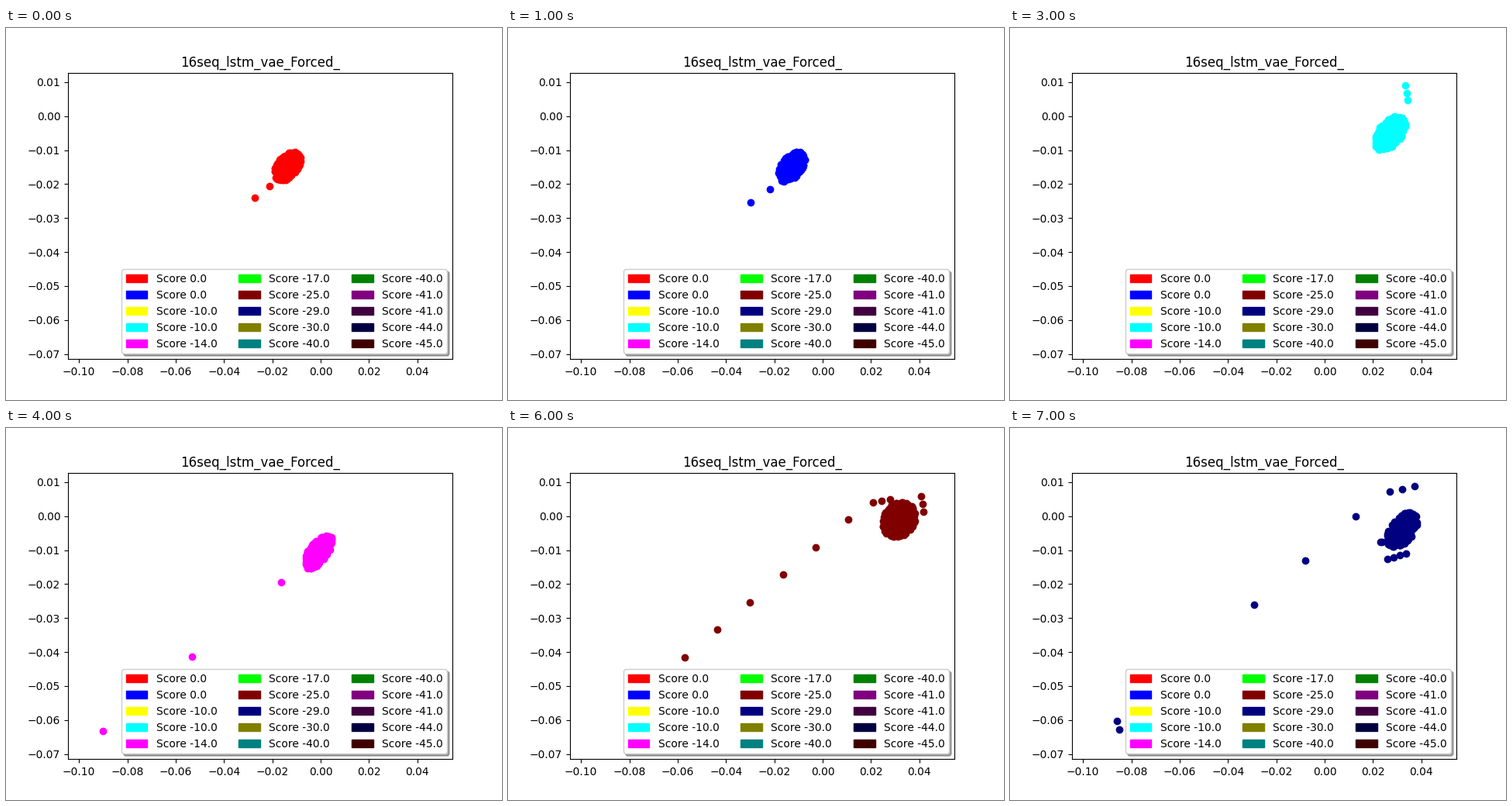
Write a matplotlib script that moves like this. It is 640 by 480 pixels and loops after 8 s.

```python
import numpy as np
import matplotlib.pyplot as plt
from matplotlib.animation import FuncAnimation
from matplotlib.patches import Patch

W, H, DPI = 640, 480, 100
XLIM = (-0.10453, 0.05447)
YLIM = (-0.0715, 0.0128)
TILT = np.radians(52)
COLORS = ["red", "blue", "yellow", "cyan", "magenta",
          "lime", "maroon", "navy", "olive", "teal",
          "green", "purple", "#400040", "#000040", "#400000"]
SCORES = [0, 0, -10, -10, -14, -17, -25, -29, -30, -40, -40, -41, -41, -44, -45]

rng = np.random.default_rng(4)
clouds = []


def to_data(points):
    """Convert stage pixels (y down) to axes data."""
    u = (points[:, 0] - 0.125 * W) / (0.775 * W)
    v = (0.89 * H - points[:, 1]) / (0.77 * H)
    return np.column_stack([XLIM[0] + u * (XLIM[1] - XLIM[0]),
                            YLIM[0] + v * (YLIM[1] - YLIM[0])])


def blob(center, long, short, count=240):
    """Random points filling an ellipse that leans up to the right."""
    angle = rng.uniform(0, 2 * np.pi, count)
    radius = np.sqrt(rng.random(count))
    a = long * radius * np.cos(angle)
    b = short * radius * np.sin(angle)
    x = a * np.cos(TILT) - b * np.sin(TILT)
    y = a * np.sin(TILT) + b * np.cos(TILT)
    return np.column_stack([center[0] + x, center[1] - y])


def add_cloud(center, long, short, *trails):
    """Each trail is a start, an end and a number of evenly spaced strays."""
    parts = [blob(center, long, short)]
    parts += [np.linspace(start, end, n) for start, end, n in trails]
    clouds.append(to_data(np.vstack(parts)))


add_cloud((363, 178), 22, 13, ((340, 204), (321, 219), 2))
add_cloud((366, 179), 22, 13, ((338, 208), (313, 225), 2))
add_cloud((441, 139), 27, 14, ((413, 143), (400, 151), 2),
          ((462, 147), (462, 147), 1), ((416, 159), (425, 154), 2))
add_cloud((490, 136), 26, 15, ((510, 74), (513, 93), 3))
add_cloud((403, 160), 26, 12, ((355, 199), (125, 391), 3))
add_cloud((404, 158), 28, 11, ((380, 168), (305, 238), 4))
add_cloud((504, 118), 24, 20, ((439, 118), (228, 296), 6),
          ((471, 96), (493, 92), 3), ((533, 88), (536, 108), 3))
add_cloud((506, 131), 26, 15, ((446, 114), (315, 228), 3),
          ((138, 378), (141, 389), 2), ((490, 82), (522, 75), 3),
          ((487, 169), (511, 162), 4), ((478, 147), (480, 147), 2))

fig, ax = plt.subplots(figsize=(W / DPI, H / DPI), dpi=DPI)
ax.set(xlim=XLIM, ylim=YLIM, title="16seq_lstm_vae_Forced_")
handles = [Patch(color=c, label=f"Score {s:.1f}") for c, s in zip(COLORS, SCORES)]
ax.legend(handles=handles, loc="lower right", ncol=3, fancybox=True, shadow=True)
dots = ax.scatter([], [])


def draw(k):
    dots.set_offsets(clouds[k])
    dots.set_color(COLORS[k])
    return (dots,)


anim = FuncAnimation(fig, draw, frames=len(clouds), interval=1000, repeat=True)
plt.show()
```
